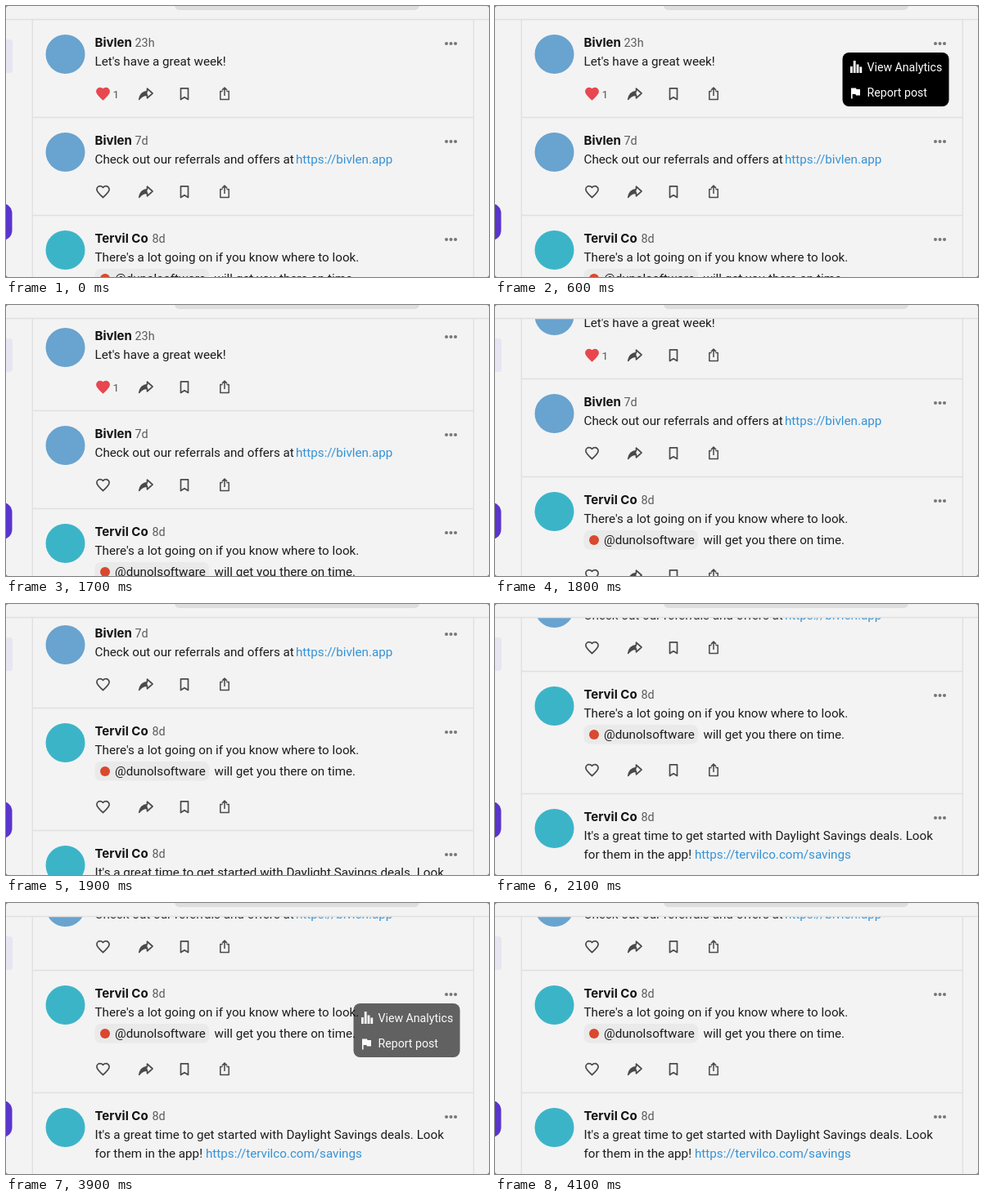
Recreate the animation shown at these times as an HTML page. Size 590 by 332 pixels, loop 4.5 s.

```html
<!DOCTYPE html>
<html lang="en">
<head>
<meta charset="utf-8">
<title>Feed with post menus</title>
<style>
  html, body { margin: 0; width: 100%; height: 100%; overflow: hidden; background: #777; }
  svg { display: block; width: 590px; height: 332px; background: #f3f3f3; border-radius: 3px; }
  text { font: 15.2px Roboto, sans-serif; fill: #1c1c1c; white-space: pre; }
  .name { font: 700 15px Inter, sans-serif; fill: #111; }
  .age { font-size: 14.4px; fill: #5c5c5c; }
  .count { font-size: 13.5px; fill: #555; }
  .link { fill: #3592d6; }
  .line { stroke: #e0e0e0; stroke-width: 1.4; }
  .icon { fill: none; stroke: #4a4a4a; stroke-width: 1.7; stroke-linejoin: round; }
  .liked { fill: #e8474f; stroke: #e8474f; }
  .menu text { font-size: 14.15px; fill: #fff; }
  .menu path { fill: #fff; }
</style>
</head>
<body>
<svg viewBox="0 0 590 332">
  <clipPath id="view"><rect y="17" width="590" height="315"/></clipPath>
  <rect id="tab" x="-10" y="41" width="18" height="41" rx="4"/>
  <rect x="-25" y="242" width="32.5" height="45" rx="12" fill="#5a35cd"/>
  <g clip-path="url(#view)"><g id="feed"></g></g>
  <path class="line" d="M0 16.5H590M32.3 16.5V332M571.3 16.5V332"/>
  <rect x="206" y="-12" width="299" height="17" rx="6" fill="#dedede"/>
  <g id="menus"></g>
</svg>
<script>
const $ = id => document.getElementById(id);
const text = (x, y, s, cls = '') => `<text x="${x}" y="${y}" class="${cls}">${s}</text>`;

const actions = (y, likes) => `<g transform="translate(0 ${y})">
  <path class="icon ${likes ? 'liked' : ''}" d="M118.5 7C113.8 2.9 110.9.3 110.9-2.7
    A4.1 4.1 0 0 1 115-6.8C116.4-6.8 117.6-6.1 118.5-5.1C119.4-6.1 120.6-6.8 122-6.8
    A4.1 4.1 0 0 1 126.1-2.7C126.1.3 123.2 2.9 118.5 7Z"/>
  ${likes ? text(130.5, 5, likes, 'count') : ''}
  <path class="icon" d="M172.5-3V-6.3L179-.5L172.5 5.3V1.6C168.5 1.6 165.2 3.2 162.7 6.8C163.6 2 166.3-2.4 172.5-3Z"/>
  <path fill="#4a4a4a" d="M162.7 6.8C163.6 2 166.3-2.4 172.5-3V1.6C168.5 1.6 165.2 3.2 162.7 6.8Z"/>
  <path class="icon" d="M213.5-6.7H222.5V7L218 4.2L213.5 7Z"/>
  <path class="icon" style="stroke-width:1.5" d="M264.6-3H261.8V7H272.2V-3H269.4M267 2.5V-7M264-4.4L267-7.4L270-4.4"/>
</g>`;

const post = (top, height, name, age, ageX, color, body, likes) => `<g transform="translate(0 ${top})">
  <path class="line" d="M32 .5H571"/>
  <circle cx="72.5" cy="43" r="24" fill="${color}"/>
  ${text(108.5, 33.5, name, 'name')}${text(ageX, 33.5, age, 'age')}
  ${[538, 543.5, 549].map(x => `<circle cx="${x}" cy="30" r="2" fill="#777"/>`).join('')}
  ${body}${actions(height - 28.5, likes)}
</g>`;

const blue = '#69a3cf', teal = '#3cb4c8';
$('feed').innerHTML =
  post(16, 120, 'Bivlen', '23h', 157.5, blue, text(108.5, 57, "Let's have a great week!"), '1') +
  post(136, 120, 'Bivlen', '7d', 157.5, blue,
    text(108.5, 57, 'Check out our referrals and offers at') +
    text(354, 57, 'https://bivlen.app', 'link')) +
  post(256, 150, 'Tervil Co', '8d', 178.5, teal,
    text(108.5, 57, "There's a lot going on if you know where to look.") +
    '<rect x="108.5" y="66" width="139.5" height="23.5" rx="7" fill="#eaeaea"/>' +
    '<circle cx="121" cy="78" r="6" fill="#d9482f"/>' +
    text(133, 83, '@dunolsoftware') + text(254.5, 83, 'will get you there on time.')) +
  post(406, 150, 'Tervil Co', '8d', 178.5, teal,
    text(108.5, 57, "It's a great time to get started with Daylight Savings deals. Look") +
    text(108.5, 79.5, 'for them in the app!') +
    text(244, 79.5, 'https://tervilco.com/savings', 'link'));

// Drawn from the top right corner, which is where the menu grows from.
const menu = `<g class="menu">
  <rect x="-130" width="130" height="66" rx="8"/>
  <path d="M-120.5 17h2.8v8h-2.8zM-116.7 10h2.8v15h-2.8zM-112.9 14.5h2.8v10.5h-2.8zM-109.1 17.5h2.8v7.5h-2.8z"/>
  <path d="M-119.5 43.5h6l.6 1.6h4.4v7.5h-5l-.6-1.6h-3.8v5.5h-1.6z"/>
  ${text(-100, 22.7, 'View Analytics')}${text(-100, 53.5, 'Report post')}
</g>`;
$('menus').innerHTML = menu + menu;
const menus = [...$('menus').children];

const scroll = [0, 7, 46, 129, 168, 174];
// Each menu: top, opening time and scales, closing time and opacities; one step per 100 ms.
const popups = [
  { top: 57, open: 400, scales: [.5, .93, 1], close: 1400, fades: [.45, 0] },
  { top: 123, open: 3000, scales: [.8, 1], close: 3900, fades: [.6, .15, 0] }
];
const pick = (list, i) => list[Math.max(0, Math.min(list.length - 1, i))];

function draw(now) {
  const t = Math.floor(now % 4500 / 100) * 100;
  const steps = from => (t - from) / 100;
  $('feed').setAttribute('transform', `translate(0 ${-pick(scroll, steps(1600))})`);
  $('tab').setAttribute('fill',
    t >= 500 && t < 1500 ? '#f3f3f3' : t >= 3000 && t < 3900 ? '#eaeaeb' : '#e7e5f1');
  popups.forEach((p, i) => {
    const opacity = t < p.open ? 0 : t < p.close ? 1 : pick(p.fades, steps(p.close));
    menus[i].setAttribute('opacity', opacity);
    menus[i].setAttribute('transform',
      `translate(554.5 ${p.top}) scale(${pick(p.scales, steps(p.open))})`);
  });
}

const start = performance.now();
function tick() {
  draw(performance.now() - start);
  requestAnimationFrame(tick);
}
tick();
</script>
</body>
</html>
```
